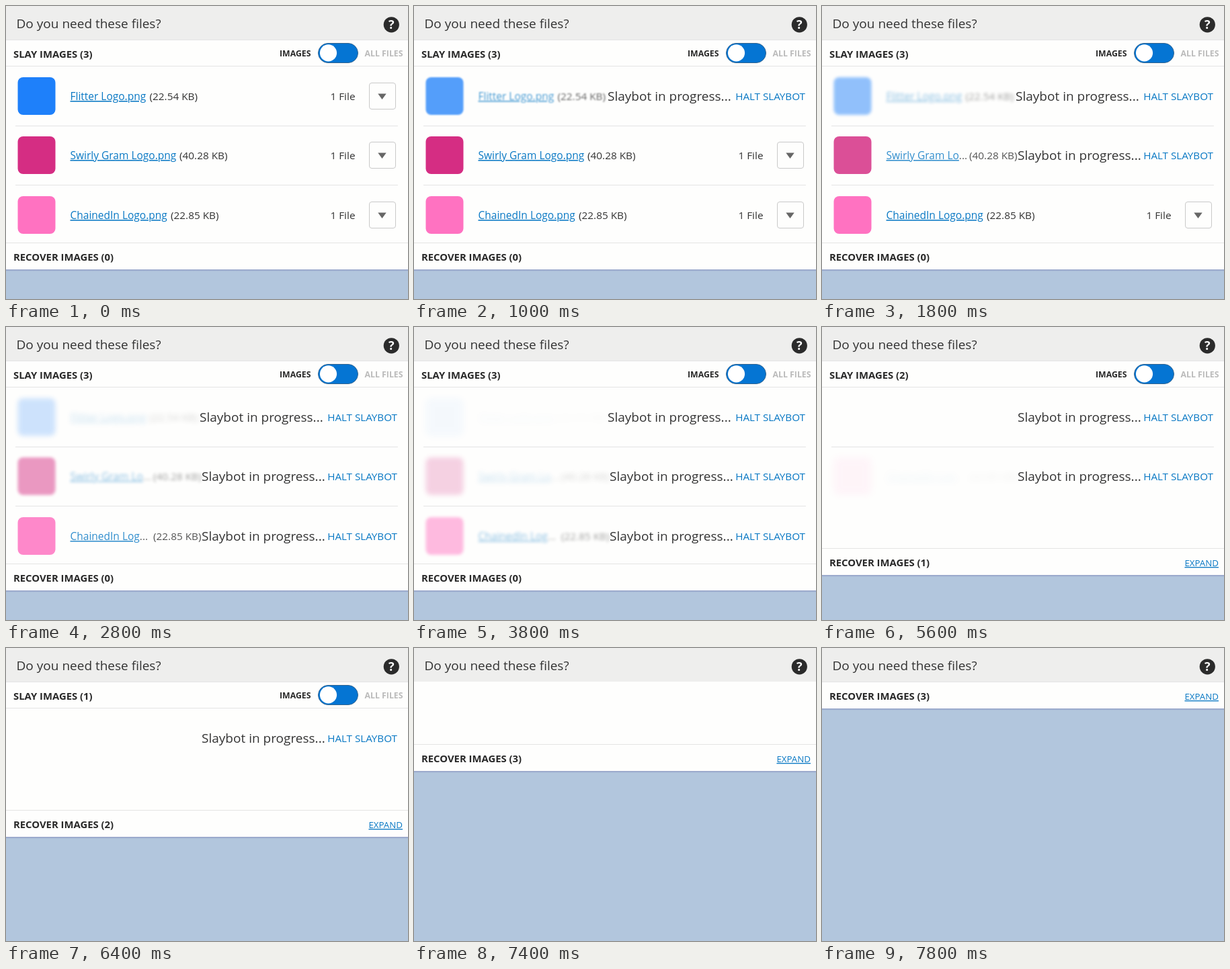
Animation of 598x436 px, one loop 8 s. Source, as an HTML page:

```html
<!DOCTYPE html>
<html lang="en">
<head>
<meta charset="utf-8">
<title>File clean-up panel</title>
<style>
  html, body { margin: 0; width: 100%; height: 100%; overflow: hidden; background: #b2c6dd; }
  svg { display: block; font: 15.35px "Open Sans", "Noto Sans", sans-serif; fill: #333; }
  .title, .status { font-size: 19px; }
  .head { font-size: 14.85px; font-weight: 700; fill: #292929; }
  .small { font-size: 12.3px; font-weight: 700; }
  .link { fill: #0878c4; text-decoration: underline 1px; text-underline-offset: 2.5px; }
  .name { font-size: 15.5px; }
  .halt { font-size: 15.2px; fill: #0878c4; }
  .expand { font-size: 13.3px; }
  .line { stroke: #e4e4e4; }
  .end { text-anchor: end; }
</style>
</head>
<body>
<svg width="598" height="436" viewBox="0 0 598 436">
  <defs>
    <linearGradient id="shade" x2="0" y2="1">
      <stop stop-color="#8f9cc4"/>
      <stop offset="1" stop-color="#b2c6dd"/>
    </linearGradient>
  </defs>
  <rect width="598" height="436" fill="#b2c6dd"/>
  <rect id="panel" y="50" width="598" fill="#fefefd"/>
  <rect width="598" height="50" fill="#eeeeed"/>

  <g id="slay">
    <path class="line" d="M0 50.5H598M0 89.5H598"/>
    <text id="slayText" class="head" x="11" y="77"></text>
    <text class="small" x="407" y="75" fill="#292929">IMAGES</text>
    <rect x="464.5" y="55.5" width="59" height="29" rx="14.5" fill="#0575d3" stroke="#34658f"/>
    <circle cx="479.5" cy="69.8" r="12.6" fill="#fff"/>
    <text class="small end" x="590.5" y="75" fill="#bbb">ALL FILES</text>
  </g>

  <g id="rows"></g>

  <g id="recover">
    <rect width="598" height="40" fill="#fefefd"/>
    <path class="line" d="M0 .5H598"/>
    <rect y="40" width="598" height="3" fill="url(#shade)"/>
    <text id="recoverText" class="head" x="11" y="27"></text>
    <text id="expand" class="link expand end" x="590" y="27">EXPAND</text>
  </g>

  <text class="title" x="15.5" y="33">Do you need these files?</text>
  <circle cx="573.3" cy="27.8" r="11.6" fill="#2b2b2b"/>
  <text x="573.3" y="34.3" text-anchor="middle" font-size="18" font-weight="700" fill="#fff">?</text>
</svg>

<script>
const LOOP = 8000, STEP = 200, PITCH = 88.4;

// start: clean-up begins; end: the row leaves the list
const files = [
  { name: "Flitter Logo.png", size: "(22.54 KB)", sizeX: 213.5, color: "#1e80fa",
    start: 400, end: 5600, statusX: 288 },
  { name: "Swirly Gram Logo.png", cut: "Swirly Gram Lo", size: "(40.28 KB)", sizeX: 258, color: "#d52d83",
    start: 1400, end: 6400, statusX: 291 },
  { name: "ChainedIn Logo.png", cut: "ChainedIn Log", size: "(22.85 KB)", sizeX: 245, color: "#ff72c1",
    start: 2400, end: 7400, statusX: 291 }
];

// tops of the recover bar as each row leaves
const tops = [352, 264, 175.5, 50];

const byId = id => document.getElementById(id);
const clamp = v => Math.max(0, Math.min(1, v));
const smooth = v => v * v * (3 - 2 * v);
const show = (el, on) => { el.style.display = on ? "" : "none"; };

function buildRow(file) {
  const row = document.createElementNS("http://www.w3.org/2000/svg", "g");
  row.innerHTML = `
    <g class="fading">
      <rect x="17.5" y="17" width="56" height="56" rx="8" fill="${file.color}"/>
      <text y="51" x="95.5"><tspan class="link name"></tspan><tspan class="dots"></tspan></text>
      <text class="size" y="51">${file.size}</text>
    </g>
    <g class="idle">
      <text class="end" x="519.5" y="51">1 File</text>
      <rect x="540.5" y="25.5" width="39" height="39" rx="3.5" fill="#fefefd" stroke="#c9c9c9"/>
      <path d="M553.3 41.5h12.4l-6.2 8.5z" fill="#666"/>
    </g>
    <g class="busy">
      <text class="status" x="${file.statusX}" y="52">Slaybot in progress...</text>
      <text class="halt end" x="582" y="51">HALT SLAYBOT</text>
    </g>
    <path class="line divider" d="M14 89.5H583"/>`;
  byId("rows").append(row);
  file.row = row;
  file.part = {};
  for (const key of ["fading", "name", "dots", "size", "idle", "busy", "divider"])
    file.part[key] = row.querySelector("." + key);
}

function drawRow(file, slot, last, t) {
  const { row, part } = file;
  show(row, t < file.end);
  row.setAttribute("transform", `translate(0 ${Math.floor(89.5 + slot * PITCH)})`);
  show(part.divider, !last);

  const busy = t >= file.start, cut = busy && file.cut;
  show(part.idle, !busy);
  show(part.busy, busy);
  part.name.textContent = cut || file.name;
  part.dots.textContent = cut ? "..." : "";
  part.size.setAttribute("x", cut ? 219 : file.sizeX);

  const age = Math.max(0, t - file.start);
  part.fading.style.opacity = Math.pow(1 - clamp(age / 4000), 1.7);
  part.fading.style.filter = age ? `blur(${age * 0.0016}px)` : "none";
}

function draw(t) {
  const gone = files.filter(f => t >= f.end).length;
  const left = files.length - gone;
  files.forEach((f, i) => drawRow(f, i - gone, i === files.length - 1, t));

  let top = tops[0];
  files.forEach((f, i) => {
    top += (tops[i + 1] - tops[i]) * smooth(clamp((t - f.end + STEP) / 600));
  });
  top = Math.round(top);
  byId("recover").setAttribute("transform", `translate(0 ${top})`);
  byId("panel").setAttribute("height", top - 50);

  show(byId("slay"), left > 0);
  show(byId("expand"), gone > 0);
  byId("slayText").textContent = `SLAY IMAGES (${left})`;
  byId("recoverText").textContent = `RECOVER IMAGES (${gone})`;
}

files.forEach(buildRow);
const begin = performance.now();
let shown = -1;

function tick() {
  const t = Math.floor(((performance.now() - begin) % LOOP) / STEP) * STEP;
  if (t !== shown) draw(shown = t);
  requestAnimationFrame(tick);
}
tick();
</script>
</body>
</html>
```
